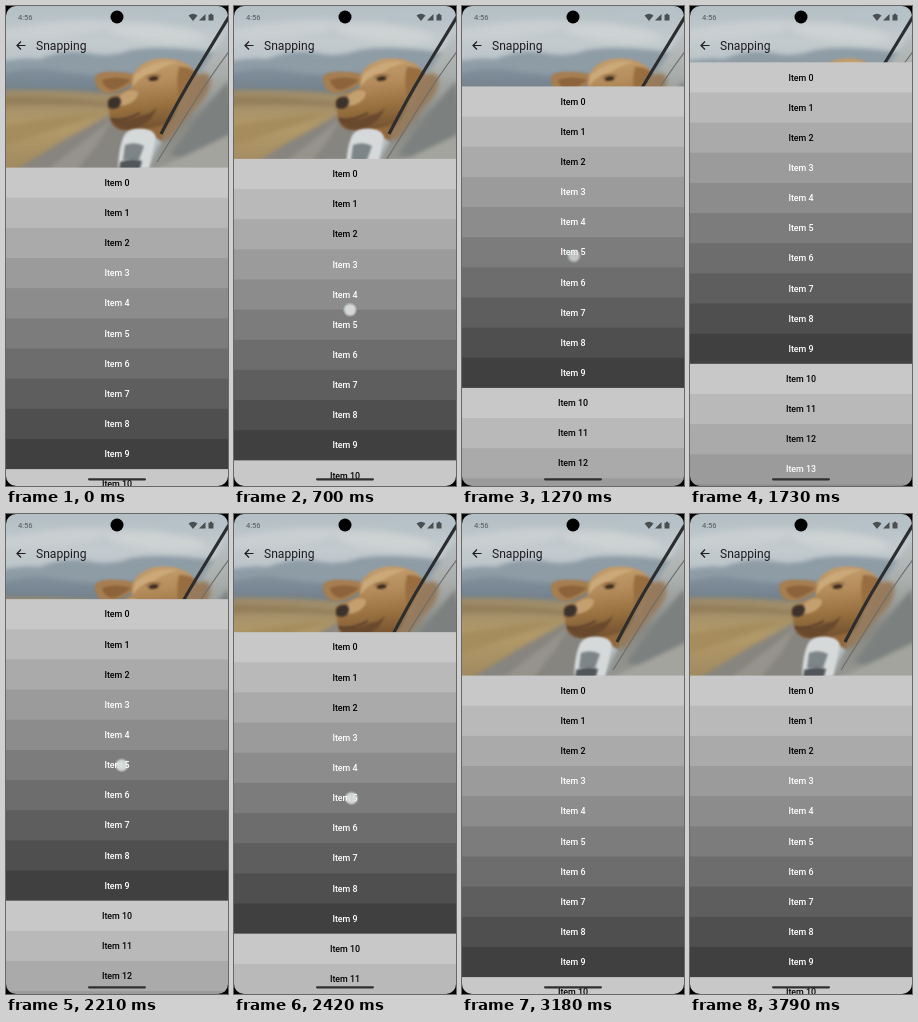
Write an HTML page with a canvas that moves like this. It is 222x480 px and loops after 3.82 s.

```html
<!DOCTYPE html>
<html lang="en">
<head>
<meta charset="utf-8">
<title>Snapping</title>
<style>
html, body { margin: 0; width: 100%; height: 100%; overflow: hidden; background: #000; }
canvas { display: block; width: 222px; height: 480px; }
</style>
</head>
<body>
<canvas id="stage" width="222" height="480"></canvas>
<script>
const W = 222, H = 480, LOOP = 3820;
const OPEN = 161.6, CLOSED = 56.3, ROW = 30.15;
const ctx = document.getElementById('stage').getContext('2d');
const clamp = v => Math.max(0, Math.min(1, v));
const mix = (a, b, k) => a + (b - a) * k;

// A swipe drags the header, then a spring settles it at `rest`.
const swipes = [
  { start: 580, end: 1197, x: [117, 112], y: [317, 250], offset: 151, rest: CLOSED },
  { start: 2000, end: 2490, x: [114, 118], y: [218, 295], offset: 166, rest: OPEN }
];

function fill(c, path, color) {
  c.fillStyle = color;
  c.fill(new Path2D(path));
}

function stroke(c, path, color, width) {
  c.strokeStyle = color;
  c.lineWidth = width;
  c.stroke(new Path2D(path));
}

function disc(c, x, y, rx, ry, color, turn = 0) {
  c.fillStyle = color;
  c.beginPath();
  c.ellipse(x, y, rx, ry, turn, 0, Math.PI * 2);
  c.fill();
}

function gradient(c, box, colors) {
  const g = c.createLinearGradient(...box);
  colors.forEach((color, i) => g.addColorStop(i / (colors.length - 1), color));
  return g;
}

function paintLandscape(c) {
  c.filter = 'blur(3px)';
  c.fillStyle = gradient(c, [0, 0, 0, 70], ['#b3bfc5', '#c3cbce', '#b6c0c5']);
  c.fillRect(-10, -10, 242, 190);
  disc(c, 50, 24, 60, 8, '#c9cfd1', -0.1);
  disc(c, 150, 27, 50, 9, '#cdd2d3', 0.1);
  disc(c, 190, 9, 35, 6, '#b6c2c9');
  c.filter = 'blur(2px)';
  fill(c, 'M-10 57 Q14 51 34 53 Q60 42 82 47 T125 44 Q160 38 232 50 V100 H-10Z', '#8e9ca6');
  fill(c, 'M-10 70 Q20 60 45 64 T88 69 L130 68 V105 H-10Z', gradient(c, [0, 60, 0, 88], ['#82919d', '#71808b']));
  fill(c, 'M-10 84 Q50 82 125 89 V170 H-10Z', gradient(c, [0, 84, 0, 162], ['#9c8b6b', '#b39a69', '#a08a60']));
  fill(c, 'M-10 90 Q40 89 104 96 V101 Q50 97 -10 100Z', '#947f5b');
  fill(c, 'M-10 121 L60 110 L100 105 L55 121 L-10 143Z', '#a58d5d');
  fill(c, 'M0 170 L58 134 L107 107 L125 112 L120 170Z', '#87857f');
  fill(c, 'M33 170 L82 132 L108 111 L91 139 L66 170Z', '#96938d');
  c.filter = 'none';
}

function paintDog(c) {
  c.filter = 'blur(0.9px)';
  fill(c, 'M122 110 Q140 105 154 89 L187 78 Q202 87 196 103 L163 140 L150 132 Q146 124 132 122Z', '#92683c');
  fill(c, 'M117 83 Q103 91 93 84 Q87 77 90 69 Q98 64 112 66 Q124 65 132 72 Q126 79 117 83Z', '#a67e51');
  fill(c, 'M96 74 Q110 69 125 74 Q116 82 106 84 Q98 82 96 74Z', '#8c633b');
  fill(c, 'M126 70 Q133 56 149 53 Q170 50 184 60 Q195 74 190 91 Q176 112 156 119 Q139 125 116 124 Q106 122 104 112 L102 99 Q101 91 110 89 L126 81Z',
    gradient(c, [140, 52, 148, 124], ['#c49e6e', '#b58d5c', '#98703f', '#715030']));
  fill(c, 'M129 68 Q148 52 172 56 Q157 60 148 67 Q136 68 126 81Z', '#cba979');
  disc(c, 121, 92, 12, 6, '#c4a071', -0.5);
  fill(c, 'M173 61 Q189 61 194 72 Q202 88 190 103 Q177 109 174 98 Q169 75 173 61Z', '#986e41');
  fill(c, 'M105 113 Q119 117 137 109 Q146 108 151 101 Q145 119 126 123 Q109 124 105 113Z', '#69492d');
  fill(c, 'M102 95 Q105 90 113 91 Q117 95 113 101 Q107 105 102 101Z', '#3c322c');
  stroke(c, 'M105 113 Q118 116 134 107', '#51382a', 1.5);
  disc(c, 147.5, 72.5, 5, 2.4, '#3b2b20', -0.15);
  stroke(c, 'M140 72 Q146 67 155 70', '#795433', 1);
  c.filter = 'none';
}

function paintCar(c) {
  c.filter = 'blur(2px)';
  fill(c, 'M230 12 L190 73 L150 145 L138 170 H230Z', gradient(c, [200, 20, 195, 162], ['#bdc4c6', '#a9adab', '#898a84', '#949590']));
  fill(c, 'M184 78 Q194 62 204 70 Q207 85 190 101 L161 136 L157 127 Q174 108 184 78Z', '#967a5b');
  fill(c, 'M222 75 L196 105 L164 148 L180 153 L230 125Z', '#7c8180');
  fill(c, 'M140 168 L230 126 V168Z', '#a4a49e');
  c.filter = 'blur(0.7px)';
  stroke(c, 'M224 9 Q207 37 190 65 T155 128', '#2b2d2f', 3.2);
  stroke(c, 'M224 44 Q201 75 182 106 T151 156', '#686d6c', 1.2);
  c.filter = 'blur(1.3px)';
  fill(c, 'M119 128 Q124 122 138 123 Q152 125 149 136 L143 162 H112 Q113 138 119 128Z', '#d5d9da');
  fill(c, 'M119 139 Q129 135 138 140 L133 154 H117Z', '#7d8588');
  fill(c, 'M114 156 Q126 151 136 155 L133 166 H113Z', '#50565a');
  c.filter = 'none';
}

const photo = document.createElement('canvas');
photo.width = W;
photo.height = 164;
const photoCtx = photo.getContext('2d');
paintLandscape(photoCtx);
paintDog(photoCtx);
paintCar(photoCtx);

function spring(from, to, ms) {
  const s = 0.02 * ms;
  return mix(to, from, (1 + s) * Math.exp(-s));
}

function headerHeight(t) {
  let height = OPEN;
  for (const s of swipes) {
    if (t < s.start) break;
    const k = clamp((t - s.start) / (s.end - s.start));
    const dragged = mix(...s.y, k) - s.offset;
    height = Math.max(CLOSED, Math.min(OPEN, dragged));
    if (t > s.end) height = spring(height, s.rest, t - s.end);
  }
  return height;
}

function label(text, x, y, font, color, align = 'left') {
  ctx.font = font + ' Roboto, sans-serif';
  ctx.fillStyle = color;
  ctx.textAlign = align;
  ctx.fillText(text, x, y);
}

function drawList(top) {
  for (let i = 0; top + i * ROW < H; i++) {
    const y = top + i * ROW, tone = i % 10;
    const gray = Math.round(mix(200, 64, tone / 9));
    ctx.fillStyle = `rgb(${gray},${gray},${gray})`;
    ctx.fillRect(0, y, W, ROW + 1);
    label('Item ' + i, 111, y + 18.2, '500 8.9px', tone < 3 ? '#000' : '#fff', 'center');
  }
}

function drawBars() {
  label('4:56', 12, 14, '400 7.6px', '#50565a');
  disc(ctx, 111, 11, 6.5, 6.5, '#000');
  const ink = '#4a4f52';
  fill(ctx, 'M182.5 9.5 Q187 6 191.5 9.5 L187 15Z', ink);
  fill(ctx, 'M193 14.5 L199.5 8 V14.5Z', ink);
  fill(ctx, 'M202.5 8.7 H204 V7.7 H206 V8.7 H207.5 V14.5 H202.5Z', ink);
  stroke(ctx, 'M19.5 39.5 H11.2 M15 35.5 L11 39.5 L15 43.5', '#1d1b20', 1.2);
  label('Snapping', 30, 43.5, '400 12.1px', '#1d1b20');
}

function drawTouch(t) {
  for (const s of swipes) {
    const k = clamp((t - s.start) / (s.end - s.start));
    const alpha = clamp((t - s.start) / 60) * (1 - clamp((t - s.end) / 200));
    if (!alpha) continue;
    const x = mix(...s.x, k), y = mix(...s.y, k);
    ctx.globalAlpha = alpha;
    disc(ctx, x, y, 7, 7, 'rgba(255,255,255,.25)');
    disc(ctx, x, y, 5.7, 5.7, 'rgba(245,248,248,.5)');
    disc(ctx, x, y, 4.3, 4.3, 'rgba(215,222,222,.7)');
    ctx.globalAlpha = 1;
  }
}

function draw(t) {
  ctx.fillStyle = '#000';
  ctx.fillRect(0, 0, W, H);
  ctx.save();
  ctx.beginPath();
  ctx.roundRect(0, 0, W, H, 10);
  ctx.clip();
  ctx.drawImage(photo, 0, 0);
  drawList(headerHeight(t));
  drawBars();
  drawTouch(t);
  ctx.fillStyle = '#303030';
  ctx.beginPath();
  ctx.roundRect(82, 472.2, 58, 2.2, 1.1);
  ctx.fill();
  ctx.restore();
}

const began = performance.now();
function tick() {
  draw((performance.now() - began) % LOOP);
  requestAnimationFrame(tick);
}
tick();
</script>
</body>
</html>
```
